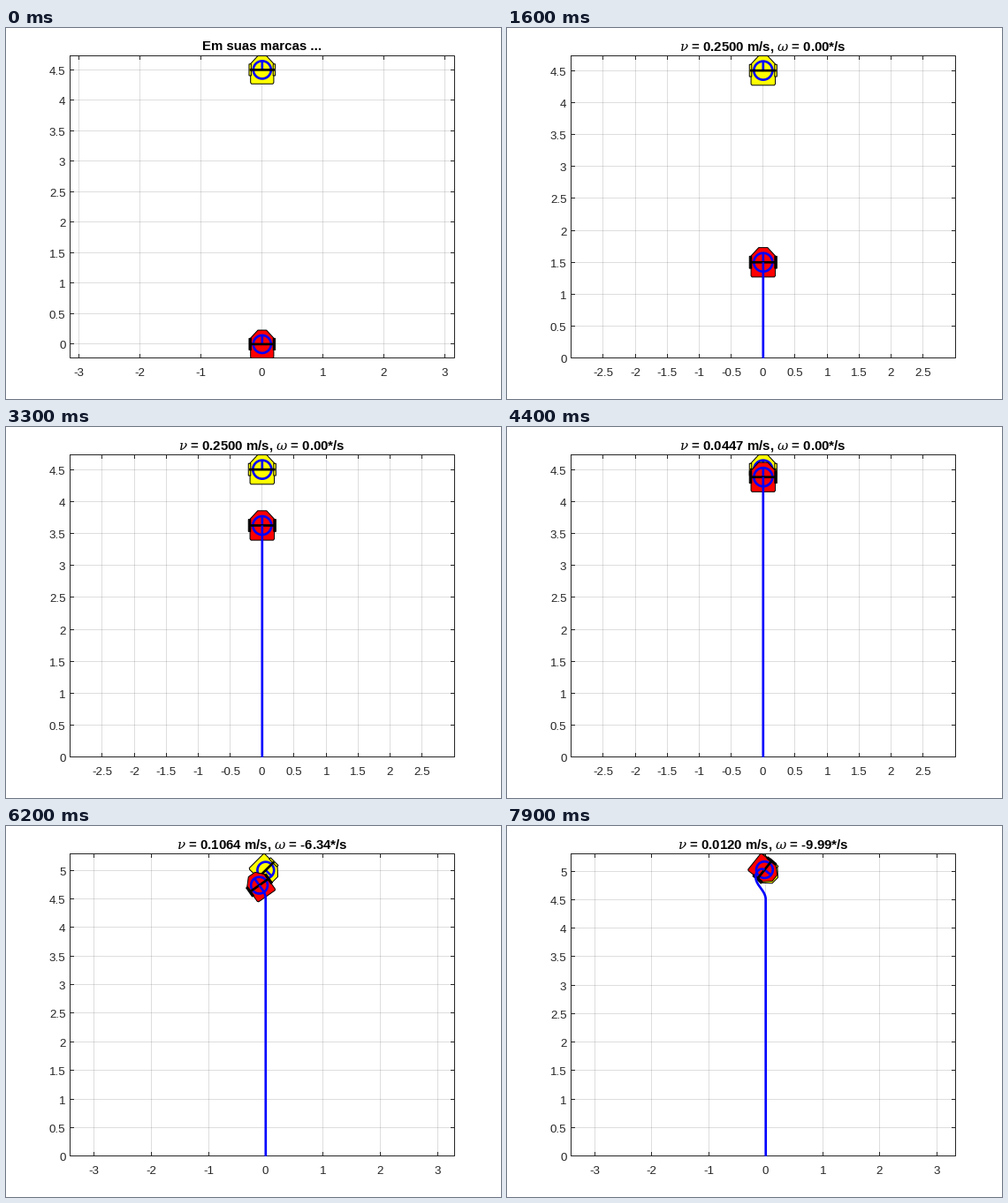
Animation of 560 by 420 pixels, one loop 8 s. Source, as a matplotlib script:

```python
import math
import numpy as np
import matplotlib.pyplot as plt
from matplotlib.animation import FuncAnimation
from matplotlib.patches import Rectangle

plt.rcParams.update({
    "font.family": "Liberation Sans",
    "mathtext.fontset": "custom",
    "mathtext.it": "DejaVu Serif:italic",
    "path.snap": False,
})

W, H, DPI = 560, 420, 100
PX = 72 / DPI
# Plot area, and the pixel rows and columns its border falls on
X0, X1, Y0, Y1 = 72.8, 506.8, 31.5, 373.8
LEFT, RIGHT, TOP, BOTTOM = 72.5, 507.5, 31.5, 373.5
READY = "Em suas marcas ..."
INK = "#262626"

# Polar controller gains, step in seconds and steps per picture
K_RHO, K_BETA = 4 / 11, -4 / 11
K_ALPHA = 2 / math.pi * K_RHO - 5 / 3 * K_BETA
V_MAX, DT, STEPS = 0.25, 0.1, 5
START_1, START_2, FRAMES = 4, 58, 80
GOALS = [(0, 4.5, math.pi / 2), (0, 5, -math.pi / 4)]

# Robot outline, nose towards +y
BODY = np.array([(-.19, -.21), (-.175, -.23), (.175, -.23), (.19, -.21),
                 (.19, .1), (.07, .23), (-.07, .23), (-.19, .1)])
WHEEL = np.array([(.18, -.095), (.215, -.095), (.215, .095), (.18, .095)])
OUTLINE = np.vstack([BODY, WHEEL, WHEEL * (-1, 1)])
TURN = np.linspace(0, 2 * math.pi, 60)
RING = 0.145 * np.column_stack([np.cos(TURN), np.sin(TURN)])
AXLE = np.array([(-.205, 0), (.205, 0)])
SPOKE = np.array([(0, 0), (0, .145)])


def wrap(a):
    return (a + math.pi) % (2 * math.pi) - math.pi


def drive(pose, goal):
    x, y, th = pose
    gx, gy, gth = goal
    rho = math.hypot(gx - x, gy - y)
    bearing = math.atan2(gy - y, gx - x)
    v = min(V_MAX, K_RHO * rho)
    w = K_ALPHA * wrap(bearing - th) + K_BETA * wrap(gth - bearing)
    pose = (x + v * math.cos(th) * DT, y + v * math.sin(th) * DT, th + w * DT)
    return pose, v, w


def simulate():
    pose, trail, shots = (0, 0, math.pi / 2), [(0, 0)], []
    goal = GOALS[0]
    for k in range(FRAMES):
        title = READY
        if k > START_1 and k != START_2:
            goal = GOALS[k > START_2]
            for _ in range(STEPS):
                if k < START_2 and math.dist(pose[:2], goal[:2]) < 0.01:
                    break
                pose, v, w = drive(pose, goal)
                trail.append(pose[:2])
            deg = round(math.degrees(w), 2) + 0.0
            title = rf"$\nu$ = {v:.4f} m/s, $\omega$ = {deg:.2f}*/s"
        shots.append((pose, goal, len(trail), title))
    return np.array(trail), shots


TRAIL, SHOTS = simulate()


def place(points, pose):
    x, y, th = pose
    a = th - math.pi / 2
    rot = np.array([(math.cos(a), math.sin(a)), (-math.sin(a), math.cos(a))])
    return points @ rot + (x, y)


class View:
    """Equal-scale window fitted round all the points."""

    def __init__(self, points):
        low, high = points.min(axis=0), points.max(axis=0)
        self.y0, self.y1 = low[1], high[1]
        self.scale = (Y1 - Y0) / (self.y1 - self.y0)
        half = (X1 - X0) / self.scale / 2
        mid = (low[0] + high[0]) / 2
        self.x0, self.x1 = mid - half, mid + half

    def px(self, points):
        p = np.atleast_2d(points)
        return np.column_stack([X0 + (p[:, 0] - self.x0) * self.scale,
                                Y1 - (p[:, 1] - self.y0) * self.scale])


fig = plt.figure(figsize=(W / DPI, H / DPI), dpi=DPI, facecolor="white")
ax = fig.add_axes([0, 0, 1, 1])


def ticks(low, high, step):
    first, last = math.ceil(low / step - 1e-6), math.floor(high / step + 1e-6)
    return [i * step for i in range(first, last + 1)]


def rule(xs, ys, alpha=1.0):
    ax.plot(xs, ys, color=INK, alpha=alpha, lw=PX, solid_capstyle="butt",
            solid_joinstyle="miter")


def draw_grid(view):
    step = 0.5 if view.x1 - view.x0 < 6.02 else 1
    font = dict(size=13.33 * PX, color=INK, va="baseline")
    for t in ticks(view.x0, view.x1, step):
        x = math.floor(view.px((t, 0))[0, 0]) + 0.5
        rule([x, x], [TOP, BOTTOM], alpha=0.15)
        rule([x, x], [TOP, TOP + 4.5])
        rule([x, x], [BOTTOM, BOTTOM - 4.5])
        ax.text(x, 393.6, f"{t:g}", ha="center", **font)
    for t in ticks(view.y0, view.y1, 0.5):
        y = math.floor(view.px((0, t))[0, 1]) + 0.5
        rule([LEFT, RIGHT], [y, y], alpha=0.15)
        rule([LEFT, LEFT + 4.5], [y, y])
        rule([RIGHT, RIGHT - 4.5], [y, y])
        ax.text(67.5, y + 5.6, f"{t:g}", ha="right", **font)
    rule([LEFT, RIGHT, RIGHT, LEFT, LEFT], [TOP, TOP, BOTTOM, BOTTOM, TOP])


def draw_stroke(points, color, clip, z):
    line, = ax.plot(*points.T, color=color, lw=2.67 * PX, zorder=z,
                    solid_capstyle="butt")
    line.set_clip_path(clip)


def draw_robot(view, pose, color, wheel, clip, z):
    parts = [(BODY, color), (WHEEL, wheel), (WHEEL * (-1, 1), wheel)]
    for points, fill in parts:
        patch = plt.Polygon(view.px(place(points, pose)), fc=fill, ec="black",
                            lw=PX, zorder=z)
        ax.add_patch(patch)
        patch.set_clip_path(clip)
    for points, col in [(RING, "blue"), (SPOKE, "blue"), (AXLE, "black")]:
        draw_stroke(view.px(place(points, pose)), col, clip, z + 0.5)


def draw(k):
    pose, goal, count, title = SHOTS[k]
    trail = TRAIL[:count]
    view = View(np.vstack([place(OUTLINE, pose), place(OUTLINE, goal), trail]))

    ax.clear()
    ax.set_xlim(0, W)
    ax.set_ylim(H, 0)
    ax.axis("off")
    clip = Rectangle((LEFT, TOP - 0.5), RIGHT - LEFT, BOTTOM - TOP + 1,
                     fc="none", ec="none")
    ax.add_patch(clip)

    draw_grid(view)
    draw_robot(view, goal, "yellow", "yellow", clip, 3)
    draw_robot(view, pose, "red", "black", clip, 4)
    if count > 1:
        draw_stroke(view.px(trail), "blue", clip, 5)
    ax.text(289.5, 25, title, size=15 * PX, weight="bold", color="black",
            ha="center", va="baseline")
    return []


anim = FuncAnimation(fig, draw, frames=FRAMES, interval=100, repeat=True,
                     repeat_delay=0, init_func=lambda: [])
plt.show()
```
